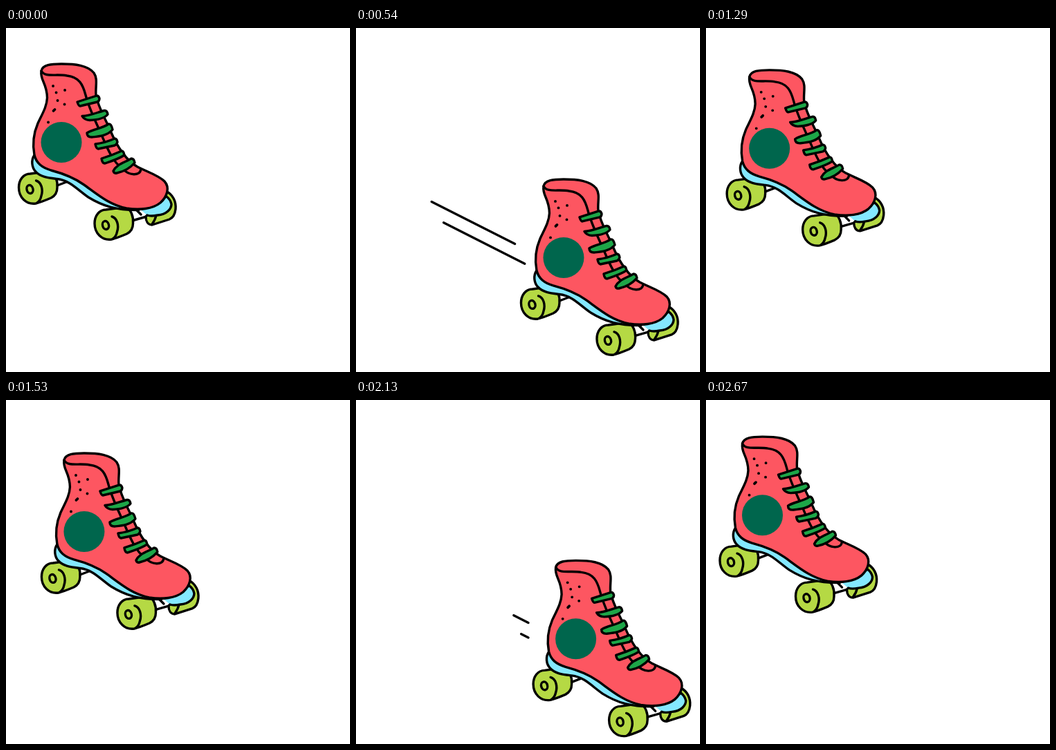
Recreate the animation shown at these times as an HTML page. Size 497 by 498 pixels, loop 2.7 s.

```html
<!DOCTYPE html>
<html lang="en">
<head>
<meta charset="utf-8">
<title>Roller skate</title>
<style>
  html, body { margin: 0; width: 100%; height: 100%; overflow: hidden; background: #fff; }
  svg { display: block; }
  .ink { fill: none; stroke: #000; stroke-width: 3.4; stroke-linecap: round; stroke-linejoin: round; }
  .lime { fill: #b5d944; }
  .sole { fill: #84e8ff; }
  .boot { fill: #fd5661; }
  .lace { fill: #1da648; }
</style>
</head>
<body>
<svg width="497" height="498" viewBox="0 0 497 498">
  <defs>
    <g id="wheel">
      <path class="lime" d="M18.500 231C18.500 220 25 211 35 211L64 207C71 211 75 221 74 231C74 238 71 243 65 246C58 249 51 252 43 254C29 256 18.500 245 18.500 231Z"/>
      <path d="M43.500 221C51 223 54 234 51 243C50 248 48 251 45 253"/>
      <ellipse cx="34.500" cy="233.500" rx="4.500" ry="6" transform="rotate(-15 34.500 233.500)"/>
    </g>
  </defs>
  <g class="ink">
    <path id="upper"/>
    <path id="lower"/>
  </g>
  <g id="skate" class="ink">
    <path d="M74 228L87 223M182 279L203 273M189 264L195 270"/>
    <path class="lime" d="M231 236C241 241 246 251 245 262C244 271 241 275 236 277L211 285C205 285 202 280 202 273L220 255Z"/>
    <path d="M211 284C214 280 216 276 217 271"/>
    <use href="#wheel"/>
    <use href="#wheel" x="109.500" y="52"/>
    <path class="sole" d="M204 271C209 273 214 272 219 271C232 270 239 262 239 255C238 250 236 247 232 244L192 261"/>
    <path class="sole" d="M41 184C36 191 37 202 43 208C50 216 62 217 74 218.500C93 221 103 234 119 245C140 258 160 264 192 263.500L200 250L60 190Z"/>
    <path class="boot" d="M51 62C53 53 65 52 80 52C100 52 118 54 127 65C133 74 129 84 130 97C133 115 143 130 151 149C159 168 171 190 190 201C203 208 220 213 229 222C237 231 233 244 223 253C212 262 193 264 174 261C149 256 131 240 112 226.500C96 215 80 210 65 206C52 202 44 196 41 184C38 168 40 152 46 138C52 125 59 114 59.500 101C59 79 49 76 51 62Z"/>
    <path d="M51 62C56 72 72 66 88 69C106 71 111 82 115 97C120 117 130 136 139 157C147 176 156 196 168 203C177 214 194 215 195 204"/>
    <g class="lace">
      <path d="M103 107L131 98Q134 98 135 102Q135 106 132 107L107 113Q105 113 103 107Z"/>
      <path d="M110 127.500C122 127 132 122 142 119.500Q146 119 147 125C142 131 132 133 121 133.500Q113 133 110 127.500Z"/>
      <path d="M117 152C126 146 138 146 148 139Q152 138 154 147C147 156 134 157 124 158Q117 158 117 152Z"/>
      <path d="M129 168Q144 166 157 160Q160 160 161 165Q160 169 157 170L133 175Q130 174 129 168Z"/>
      <path d="M138 189Q154 184 167 178Q170 178 171 184Q164 189 143 196Q139 196 138 189Z"/>
      <path d="M155 207C160 197 171 195 181 189Q185 189 186 195C179 203 170 208 160 210Q156 211 155 207Z"/>
    </g>
    <path stroke-width="3.8" d="M68 84h.1M85 90h.1M72.500 93.500h.1M74.500 105h.1M84.500 110.500h.1M68.500 120L70.500 118M61 136.500h.1"/>
    <circle cx="80" cy="165.500" r="29.500" fill="#00664d" stroke="none"/>
  </g>
</svg>
<script>
const LOOP = 2700, STEP = 30;
const TURNS = [0, 690, 1380, 2040, 2700];
const byId = id => document.getElementById(id);

const ease = (t, from, to) => {
  const s = Math.min(1, Math.max(0, (t - from) / (to - from)));
  return s * s * (3 - 2 * s);
};

// A streak is a fixed slanted line whose tip and then tail run along it.
function streak(id, t, x0, y0, delay) {
  const length = 249 - x0;
  const tip = length * ease(t, delay, delay + 300);
  const tail = length * ease(t, delay + 92, delay + 545);
  const point = d => `${x0 + d} ${y0 + d * 0.508}`;
  byId(id).setAttribute("d", tip - tail > 0.1 ? `M${point(tail)}L${point(tip)}` : "");
}

function draw(now) {
  const t = Math.floor((now % LOOP) / STEP) * STEP;
  const leg = TURNS.findIndex((start, i) => t >= start && t < TURNS[i + 1]);
  const progress = ease(t, TURNS[leg], TURNS[leg + 1]);
  const place = leg % 2 ? 1 - progress : progress;
  byId("skate").setAttribute("transform", `translate(${250.3 * place} ${190 * place})`);

  const ride = t % TURNS[2];
  streak("upper", ride, 62.5, 227.7, 300);
  streak("lower", ride, 63, 249.5, 270);
}

const begin = performance.now();
function tick() {
  draw(performance.now() - begin);
  requestAnimationFrame(tick);
}
tick();
</script>
</body>
</html>
```
